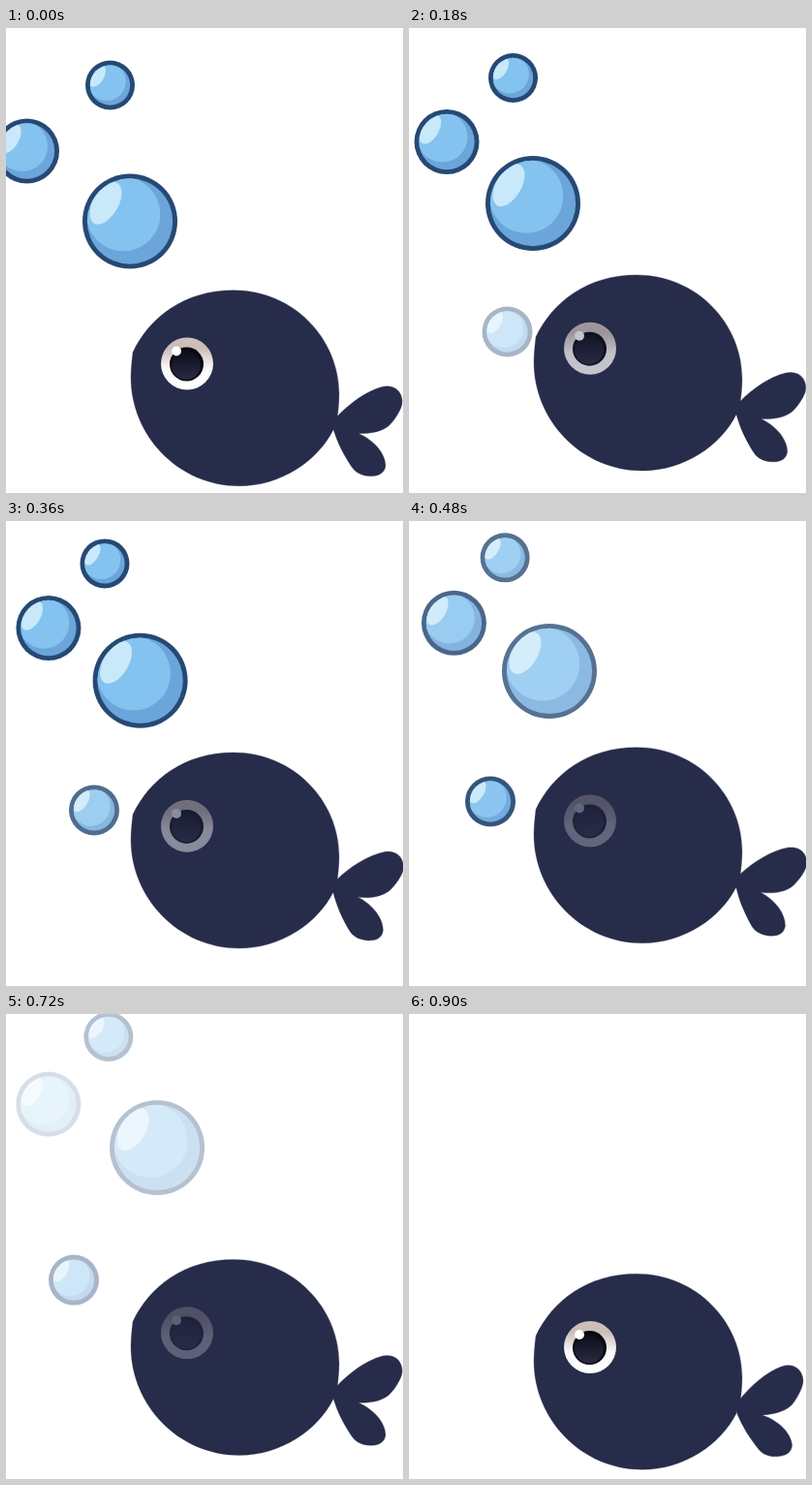
Recreate the animation shown at these times as an HTML page. Size 410 by 480 pixels, loop 1.14 s.

```html
<!DOCTYPE html>
<html lang="en">
<head>
<meta charset="utf-8">
<title>Fish and bubbles</title>
<style>
html, body { margin: 0; width: 100%; height: 100%; overflow: hidden; background: #fff; }
svg { display: block; width: 100%; height: 100%; }
</style>
</head>
<body>
<svg viewBox="0 0 410 480">
  <defs>
    <linearGradient id="white" x2="0" y2="1">
      <stop offset="0" stop-color="#cec0bb"/>
      <stop offset=".2" stop-color="#cabcb6"/>
      <stop offset=".6" stop-color="#fbfafa"/>
      <stop offset="1" stop-color="#fff"/>
    </linearGradient>
    <linearGradient id="iris" x2="0" y2="1">
      <stop offset="0" stop-color="#0c0d18"/>
      <stop offset="1" stop-color="#2a2b42"/>
    </linearGradient>
  </defs>
  <g id="bubbles"></g>
  <g id="fish">
    <g fill="#272c4a" stroke="#272c4a" stroke-opacity=".3">
      <path id="tail" d="M341 402C355 387 372 375 388 370.5C396 368.5 402 370.5 406 375.5C409 380 409.5 384 409 388C408 394 402 404 396 410C388 417 376 419 364 418.5C381 426 392 440 392 452C391 460 384 463 375 462.5C367 462 361 459 357 453C349 441 343 430 338 414Z"/>
      <path d="M131 334.7C148 298.7 184 270.7 235 270.7C297 270.7 344 320.7 344 377.7C344 386.7 343 395.7 342 402.7L338 414.7C322 446.7 284 472.7 241 472.7C178 472.7 129 420.7 129 360.7C129 351.7 130 343.7 131 334.7Z"/>
    </g>
    <g id="eye">
      <circle cx="187" cy="346.5" r="27" fill="url(#white)"/>
      <circle cx="186.5" cy="347" r="17.5" fill="#07070f"/>
      <circle cx="186" cy="348" r="15" fill="url(#iris)"/>
      <circle cx="176" cy="333.5" r="5" fill="#fff"/>
    </g>
  </g>
</svg>
<script>
const LOOP = 1140, STEP = 30, END = 900, TURN = 180;
const $ = id => document.getElementById(id);
const ramp = (t, from, to) => Math.max(0, Math.min(1, (t - from) / (to - from)));
const bezier = (a, b, c, d, u) => {
  const v = 1 - u;
  return a * v * v * v + 3 * b * v * v * u + 3 * c * v * u * u + d * u * u * u;
};

// Each bubble rises straight from start until TURN, then follows a curve
const bubbles = [
  { r: 49, start: [128, 199.5], curve: [[128, 181], [143, 158], [154.5, 140], [163, 127.5]],
    alpha: t => 1 - ramp(t, 360, 900) },
  { r: 33.5, start: [21.5, 127], curve: [[39, 117.5], [45, 109], [57, 97.5], [30.5, 82.5]],
    alpha: t => 1 - ramp(t, 420, 785) },
  { r: 25.5, start: [107.5, 59], curve: [[107.5, 51.5], [102, 42.5], [82, 29], [131, 10.5]],
    alpha: t => 1 - ramp(t, 360, 900) },
  { r: 26, start: [112, 330.5], curve: [[101.5, 313.5], [87.5, 292], [73.5, 276], [59.5, 266]],
    alpha: t => 1 - Math.abs(t - 450) / 450 }
];

bubbles.forEach((b, i) => {
  const r = b.r, inner = r - 4.8;
  $('bubbles').insertAdjacentHTML('beforeend', `<g>
    <clipPath id="clip${i}"><circle r="${inner}"/></clipPath>
    <circle r="${r}" fill="#264973"/>
    <circle r="${inner}" fill="#6ca5da"/>
    <g clip-path="url(#clip${i})">
      <circle cx="${-.14 * r}" cy="${-.15 * r}" r="${.78 * r}" fill="#84c3ef"/>
      <ellipse rx="${.265 * r}" ry="${.49 * r}" fill="#c9e8fa"
        transform="translate(${-.51 * r} ${-.38 * r}) rotate(30)"/>
    </g></g>`);
  b.node = $('bubbles').lastElementChild;
});

function place({ start, curve }, t) {
  const rise = ramp(t, 0, TURN), u = ramp(t, TURN, END);
  return [0, 1].map(k =>
    (start[k] - curve[0][k]) * (1 - rise) + bezier(...curve.map(p => p[k]), u));
}

function draw(now) {
  const t = Math.min(END, Math.floor((now % LOOP) / STEP) * STEP);
  for (const b of bubbles) {
    b.node.setAttribute('transform', `translate(${place(b, t)})`);
    b.node.setAttribute('opacity', b.alpha(t));
  }
  const lift = 39.5 * (ramp(t, 0, 450) - ramp(t, 450, 930));
  const swing = 5 * ramp(t, 0, 540) - 10 * ramp(t, 540, 900);
  $('fish').setAttribute('transform', `translate(0 ${-lift})`);
  $('tail').setAttribute('transform', `rotate(${swing} 340 408)`);
  $('eye').setAttribute('opacity', 1 - ramp(t, 0, 660) + ramp(t, 660, 900));
}

let start;
function tick(now) {
  start ??= now;
  draw(now - start);
  requestAnimationFrame(tick);
}
draw(0);
requestAnimationFrame(tick);
</script>
</body>
</html>
```
